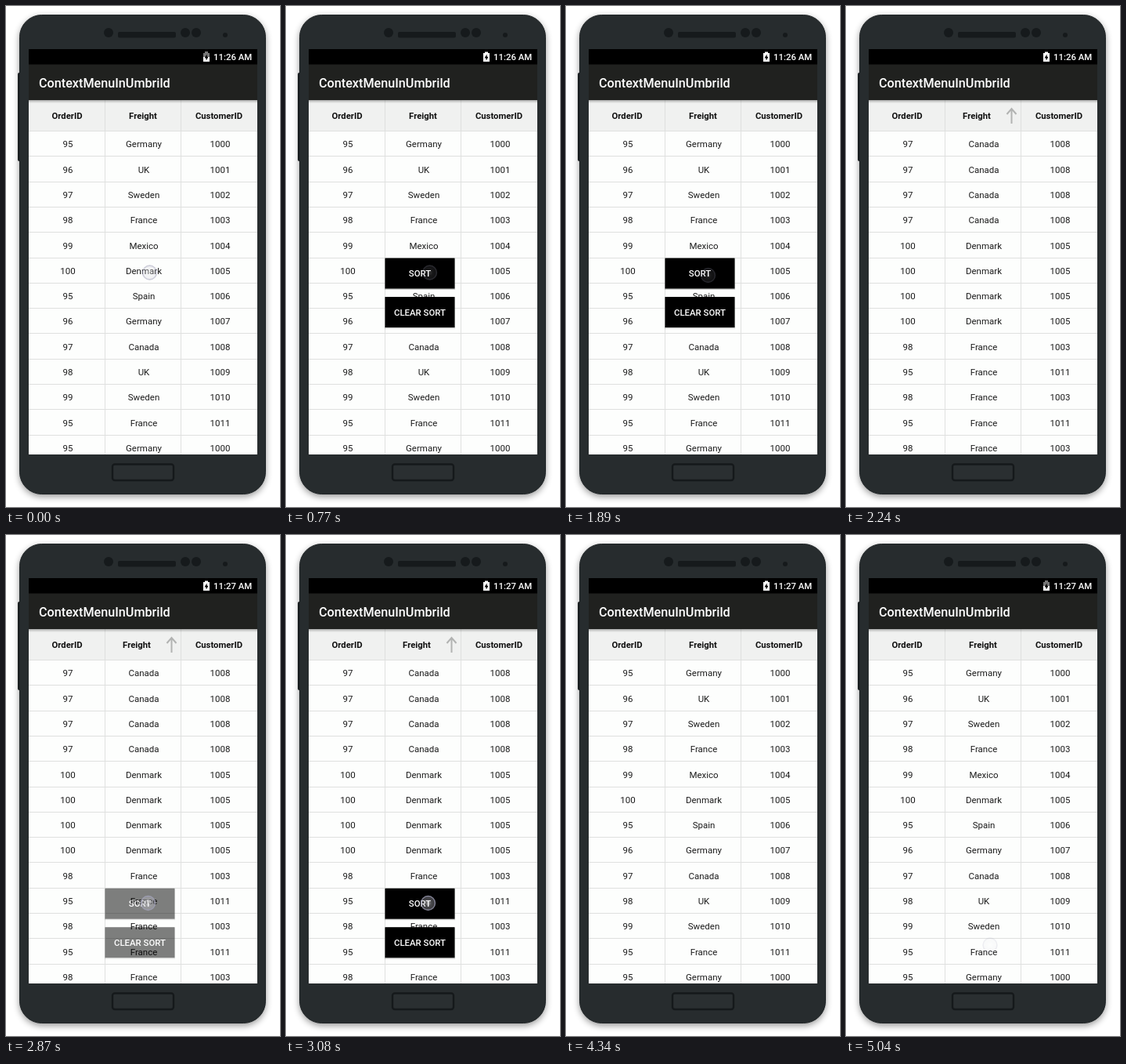
Write an HTML page that moves like this. It is 350 px wide and 639 px high and loops after 5.07 s.

```html
<!DOCTYPE html>
<html lang="en">
<head>
<meta charset="utf-8">
<title>Context menu demo</title>
<style>
  html, body { margin: 0; width: 100%; height: 100%; overflow: hidden; background: #fff; }
  svg { display: block; width: 350px; height: 639px; }
  text { font-family: Roboto, Arial, sans-serif; font-size: 11.5px; fill: #1c1c1c; }
  .mid text, text.mid { text-anchor: middle; }
  .head text { font-weight: 700; font-size: 11.3px; fill: #111; }
  .menu text { font-weight: 500; font-size: 11.4px; fill: #fff; text-anchor: middle; }
</style>
</head>
<body>
<svg viewBox="0 0 350 639" xmlns="http://www.w3.org/2000/svg">
  <defs>
    <clipPath id="screen"><rect x="29" y="55" width="292" height="517"/></clipPath>
    <filter id="soft" x="-10%" y="-10%" width="120%" height="120%"><feGaussianBlur stdDeviation="4"/></filter>
    <linearGradient id="drop" x2="0" y2="1">
      <stop offset="0" stop-color="#000" stop-opacity=".28"/>
      <stop offset="1" stop-color="#000" stop-opacity="0"/>
    </linearGradient>
    <radialGradient id="glow">
      <stop offset="0" stop-color="#f0f0f4" stop-opacity=".95"/>
      <stop offset=".5" stop-color="#d4d4de" stop-opacity=".75"/>
      <stop offset="1" stop-color="#c6c6d2" stop-opacity=".6"/>
    </radialGradient>
  </defs>

  <rect x="17" y="14" width="315" height="612" rx="29" fill="#000" opacity=".4" filter="url(#soft)"/>
  <rect x="15" y="85" width="6" height="113" rx="2" fill="#1b1f21"/>
  <rect x="17.5" y="11.5" width="314" height="611" rx="28" fill="#272c2e" stroke="#1f2426"/>
  <g fill="#161a1c">
    <circle cx="131" cy="34" r="6"/>
    <rect x="143" y="33" width="74" height="7.5" rx="2"/>
    <circle cx="229" cy="34" r="6"/>
    <circle cx="243" cy="34" r="6"/>
    <circle cx="280" cy="37" r="3"/>
  </g>
  <rect x="136" y="584.5" width="78" height="20.5" rx="3" fill="#2a2f31" stroke="#15191b" stroke-width="2.4"/>

  <g clip-path="url(#screen)">
    <rect x="29" y="55" width="292" height="517" fill="#fdfefd"/>
    <rect x="29" y="120" width="292" height="40" fill="#f0f1f0"/>
    <g id="grid" stroke="#dfe0df" fill="none"></g>
    <rect x="29" y="120" width="292" height="4" fill="url(#drop)"/>
    <g class="mid head">
      <text x="78" y="144">OrderID</text>
      <text id="freight" x="175" y="144">Freight</text>
      <text x="272" y="144">CustomerID</text>
    </g>
    <path id="arrow" d="M211.5 150V132M205.5 138L211.5 131L217.5 138" fill="none" stroke="#b2b3b2" stroke-width="2"/>
    <g id="rows" class="mid"></g>

    <rect x="29" y="55" width="292" height="20" fill="#000"/>
    <rect x="29" y="74.5" width="292" height="45.5" fill="#20211f"/>
    <text x="42" y="103.5" style="font-size:16.2px;font-weight:500;fill:#fff">ContextMenuInUmbrild</text>
    <text id="clock" x="265" y="69" style="font-size:11.4px;font-weight:500;fill:#fff"></text>
    <path d="M254 58.5h4v1.5h2v11h-8v-11h2z" fill="#fff"/>
    <path id="drain" fill="#777"/>
    <path d="M256.6 61.5L253.6 66.4H255.6V69.8L258.5 64.8H256.6Z" fill="#000"/>

    <g id="menu" class="menu"></g>
    <g id="touch">
      <circle r="8.7" fill="url(#glow)" opacity=".62"/>
      <circle r="8.9" fill="none" stroke="#a6a6bd" stroke-width="1.6"/>
      <circle r="3" fill="#fff" opacity=".3"/>
    </g>
  </g>
</svg>
<script>
const LOOP = 5070, TICK = 70, PITCH = 32.3, TOP = 160;
const $ = id => document.getElementById(id);

const plain = [
  "95 Germany 1000", "96 UK 1001", "97 Sweden 1002", "98 France 1003", "99 Mexico 1004",
  "100 Denmark 1005", "95 Spain 1006", "96 Germany 1007", "97 Canada 1008", "98 UK 1009",
  "99 Sweden 1010", "95 France 1011", "95 Germany 1000"
];
const sorted = [
  ...Array(4).fill("97 Canada 1008"),
  ...Array(4).fill("100 Denmark 1005"),
  ...Array.from({ length: 5 }, (_, i) => i % 2 ? "95 France 1011" : "98 France 1003")
];

const label = (x, y, s) => `<text x="${x}" y="${y}">${s}</text>`;
const table = list => list.map((row, i) => {
  const y = (TOP + PITCH * i + 20.3).toFixed(1);
  return row.split(" ").map((s, c) => label([79, 176, 273.5][c], y, s)).join("");
}).join("");

const button = (y, s) =>
  `<rect x="126" y="${y + 1}" width="90" height="39.5" fill="#555" opacity=".25"/>` +
  `<rect x="126.5" y="${y}" width="89" height="39" fill="#000"/>` + label(171, y + 23.5, s);

let lines = "M126.5 120V572M223.5 120V572";
for (let i = 0; i < 13; i++) lines += `M29 ${Math.round(TOP + PITCH * i) - .5}H321`;
$("grid").innerHTML = `<path d="${lines}"/>`;
$("menu").innerHTML = button(321.5, "SORT") + button(371, "CLEAR SORT");

// Linear interpolation through [time, value] points
function along(points, t) {
  for (let i = 1; i < points.length; i++) {
    const [t0, a] = points[i - 1], [t1, b] = points[i];
    if (t <= t1) return a + (b - a) * Math.max(0, (t - t0) / (t1 - t0));
  }
  return points[points.length - 1][1];
}

// Each touch: start, end, position, opacity over time
const touches = [
  { from: 0, to: 1120, x: 183.5, y: 340, fade: [[140, .55], [420, .75], [770, .24], [1050, 0]] },
  { from: 1190, to: 1960, x: 181.5, y: 343.5, fade: [[1190, .3], [1260, .65], [1330, .65], [1890, .22]] },
  { from: 2660, to: 4130, x: 181.5, y: 469.5, fade: [[2590, 0], [2800, .75], [3150, .75], [3780, .32], [4060, 0]] },
  { from: 4480, to: LOOP, x: 184, y: 523, fade: [[4410, 0], [4970, .18]] }
];
const menuFade = [
  [350, 0], [490, 1], [1890, 1], [2100, 0],
  [2800, 0], [2940, 1], [4130, 1], [4340, 0]
];

// Lower edge of the uncharged part of the battery
const charge = [[0, 65], [70, 61], [280, 58], [1190, 65], [1260, 58], [2450, 65],
  [2520, 61], [2660, 58], [3850, 65], [3920, 61], [3990, 58], [4970, 65]];

let shown = null;
function setRows(isSorted) {
  if (shown === isSorted) return;
  shown = isSorted;
  $("rows").innerHTML = table(isSorted ? sorted : plain);
  $("freight").setAttribute("x", isSorted ? 167 : 175);
  $("arrow").setAttribute("visibility", isSorted ? "visible" : "hidden");
}

function draw(time) {
  const t = Math.floor(time / TICK) * TICK;
  setRows(t >= 2030 && t < 4200);
  $("clock").textContent = t < 2310 ? "11:26 AM" : "11:27 AM";

  const edge = charge.filter(c => c[0] <= t).pop()[1];
  $("drain").setAttribute("d", edge > 60 ? `M254 58.5h4v1.5h2V${edge}h-8V60h2z` : "");

  $("menu").setAttribute("opacity", along(menuFade, t));
  $("menu").setAttribute("transform", `translate(0 ${t < 2400 ? 0 : 129.2})`);

  const hit = touches.find(p => t >= p.from && t < p.to);
  $("touch").setAttribute("opacity", hit ? along(hit.fade, t) : 0);
  if (hit) $("touch").setAttribute("transform", `translate(${hit.x} ${hit.y})`);
}

const start = performance.now();
function loop() {
  draw((performance.now() - start) % LOOP);
  requestAnimationFrame(loop);
}
loop();
</script>
</body>
</html>
```
